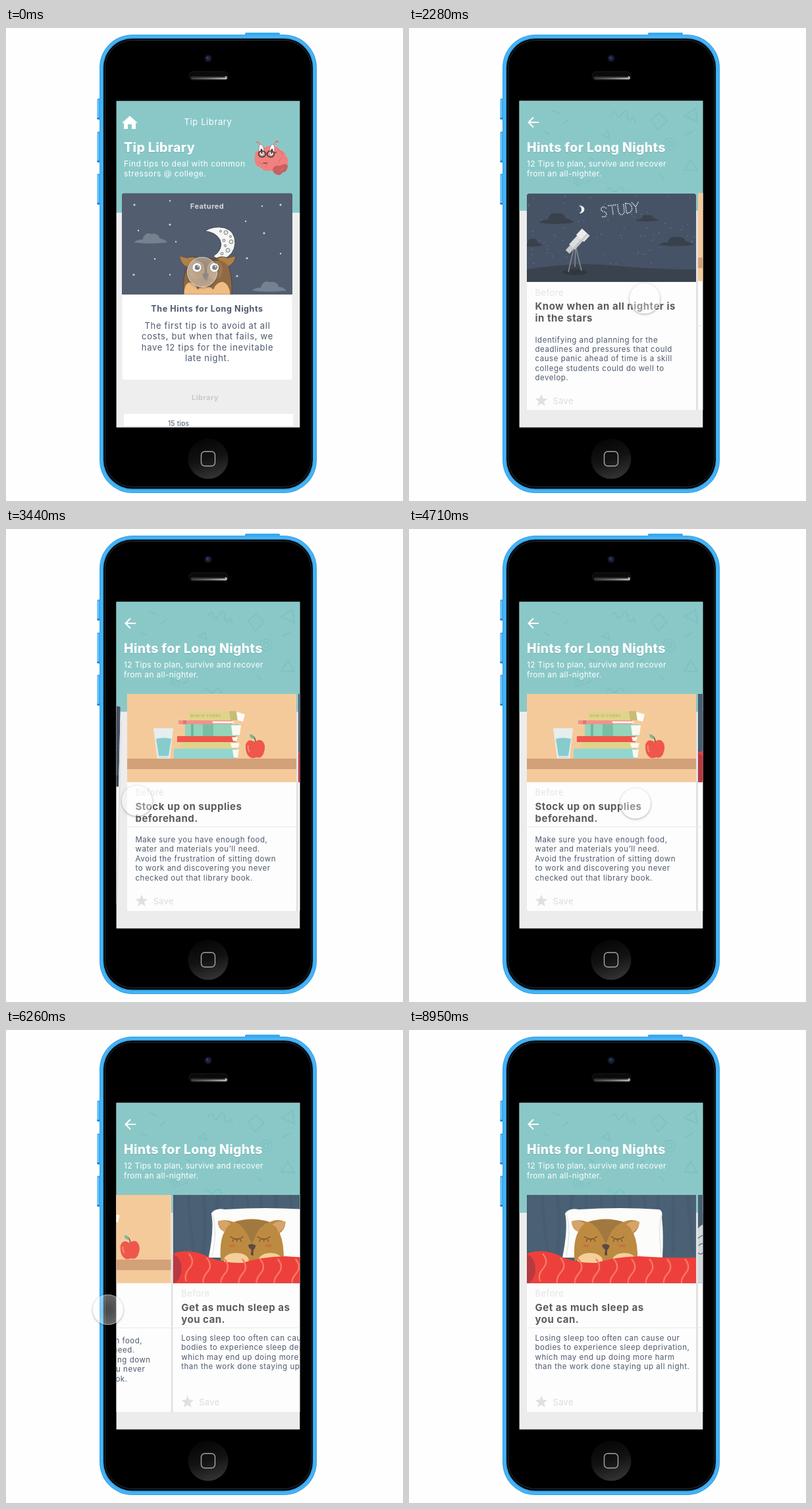
Animation of 603x717 px, one loop 9250 ms. Source, as an HTML page with a canvas:

```html
<!DOCTYPE html>
<html lang="en">
<head>
<meta charset="utf-8">
<title>Tip Library</title>
<style>
html, body { margin: 0; width: 603px; height: 717px; overflow: hidden; background: #fefefe; }
canvas { display: block; }
</style>
</head>
<body>
<canvas id="stage" width="603" height="717"></canvas>
<script>
const LOOP = 9250, PITCH = 260;
const stage = document.getElementById('stage').getContext('2d');
let g = stage;

// ---- drawing helpers ----
function shape(d, fill, stroke, width = 1) {
  const path = new Path2D(d);
  if (fill) { g.fillStyle = fill; g.fill(path); }
  if (stroke) { g.strokeStyle = stroke; g.lineWidth = width; g.stroke(path); }
}
function rect(x, y, w, h, fill) { g.fillStyle = fill; g.fillRect(x, y, w, h); }
function round(x, y, w, h, r, fill, stroke, width = 1) {
  g.beginPath(); g.roundRect(x, y, w, h, r);
  if (fill) { g.fillStyle = fill; g.fill(); }
  if (stroke) { g.strokeStyle = stroke; g.lineWidth = width; g.stroke(); }
}
function oval(x, y, rx, ry, fill, stroke, width = 1) {
  g.beginPath(); g.ellipse(x, y, rx, ry, 0, 0, 7);
  if (fill) { g.fillStyle = fill; g.fill(); }
  if (stroke) { g.strokeStyle = stroke; g.lineWidth = width; g.stroke(); }
}
function text(s, x, y, size, weight, color, gap = 0, align = 'left') {
  g.font = `${weight} ${size}px Inter, "Open Sans", sans-serif`;
  g.letterSpacing = gap + 'px';
  g.textAlign = align;
  g.fillStyle = color;
  g.fillText(s, x, y);
}
function lines(list, x, y, step, ...style) {
  list.forEach((s, i) => text(s, x, y + i * step, ...style));
}
function heading(s) {
  text(s, 179, 188.5, 19.5, 800, 'rgba(60,120,125,.35)', .35);
  text(s, 179, 187.5, 19.5, 800, '#fff', .35);
}
function clipped(x, y, w, h, r, draw) {
  g.save(); g.beginPath(); g.roundRect(x, y, w, h, r); g.clip(); draw(); g.restore();
}
function random(seed) {
  return () => (seed = (seed * 16807) % 2147483647) / 2147483647;
}
function gradient(x0, y0, x1, y1, ...colors) {
  const f = g.createLinearGradient(x0, y0, x1, y1);
  colors.forEach((c, i) => f.addColorStop(i / (colors.length - 1), c));
  return f;
}
function cloud(x, y, w, h, fill) {
  shape(`M${x} ${y}q${w * .12} ${-h * .35} ${w * .26} ${-h * .3}q${w * .08} ${-h * .9} ${w * .26} ${-h * .6}
    q${w * .2} ${-h * .2} ${w * .26} ${h * .5}q${w * .14} 0 ${w * .22} ${h * .4}q${-w * .5} ${h * .25} ${-w} 0z`, fill);
}

// ---- motion: smooth monotone interpolation through keys [time, values...] ----
function track(keys, t, col) {
  const last = keys.length - 1;
  if (t <= keys[0][0]) return keys[0][col];
  if (t >= keys[last][0]) return keys[last][col];
  let i = 0;
  while (t >= keys[i + 1][0]) i++;
  const slope = k => k < 0 || k >= last ? 0 : (keys[k + 1][col] - keys[k][col]) / (keys[k + 1][0] - keys[k][0]);
  const tangent = k => {
    const a = slope(k - 1), b = slope(k);
    return a * b <= 0 ? 0 : 2 * a * b / (a + b);
  };
  const h = keys[i + 1][0] - keys[i][0], u = (t - keys[i][0]) / h, v = 1 - u;
  return keys[i][col] * (1 + 2 * u) * v * v + tangent(i) * h * u * v * v +
    keys[i + 1][col] * u * u * (3 - 2 * u) - tangent(i + 1) * h * u * u * v;
}
const touchKeys = [
  [1200, 298, 370], [1420, 285, 400], [1650, 292, 440], [1850, 325, 454], [2100, 358, 422],
  [2160, 358, 422], [2280, 358, 410], [2570, 358, 410], [2750, 343, 410], [2950, 278, 410],
  [3150, 215, 411], [3300, 201, 412], [3440, 199, 412], [3500, 199, 412], [3800, 235, 420],
  [4150, 325, 450], [4420, 350, 455], [4480, 350, 455], [4710, 344, 416], [5000, 335, 416],
  [5360, 335, 416], [5700, 325, 416], [5920, 290, 416], [6100, 215, 418], [6260, 155, 424],
  [6320, 153, 426], [7080, 149, 434], [8100, 149, 434], [8400, 240, 490], [8650, 430, 610],
  [8950, 632, 745]
];
const scrollKeys = [
  [2570, 0], [2750, 15], [2950, 80], [3150, 185], [3300, 238], [3440, 255], [3620, 260],
  [5360, 260], [5700, 272], [5920, 307], [6100, 382], [6260, 445], [6320, 460], [6600, 500],
  [6850, 516], [7080, 520]
];

// ---- phone ----
function phone() {
  rect(0, 0, 603, 717, '#fefefe');
  for (const [y, h] of [[107, 32], [157, 47], [221, 47]]) {
    round(138.5, y, 7, h, 1.5, '#39a9ef');
    rect(139.5, y + 2, 1.5, h - 4, '#7accfa');
    rect(138.5, y + h - 3, 5, 2, '#1f7fc0');
  }
  round(363, 7, 53, 6, 1.5, '#3aaaf0');
  round(142, 10, 330, 695, 50, '#3aa6ea');
  round(143.5, 11.5, 327, 692, 48.5, '#4ab5f7');
  round(146, 14, 322, 687, 46, '#3caaf0');
  round(148, 16, 318, 682.5, 44, '#04080b');
  round(150.5, 18.5, 313, 677, 42, '#000', '#2c3a43', .8);
  oval(307, 46, 5.5, 5.5, '#13151c');
  oval(307, 46, 3.6, 3.6, '#1a2346');
  oval(306, 45, 1.4, 1.4, '#33457f');
  round(278, 66, 59, 13, 6.5, '#0a0a0a', '#191919');
  round(281, 73, 55, 5, 2.5, gradient(281, 0, 336, 0, '#3a3a3a', '#6a6a6a', '#b0b0b0'));
  round(282, 73, 51, 2, 1, '#262626');
  oval(307, 653, 30.5, 30.5, gradient(296, 622, 314, 684, '#050505', '#121212', '#353535'));
  round(296.5, 642, 21, 22, 5.5, null, '#a7a7a7', 1.4);
}

// ---- library screen ----
function brain() {
  shape('M387 180q-1-7-5-6M407 179q1-8 5-6', null, '#ee7773', 1.2);
  shape('M380 174l3-2M410 171l4 2', null, '#e8615f', 1.5);
  shape('M378 195q-1-8 7-10q2-5 9-4q5-4 11-1q8-1 11 5q8 2 9 9q6 6 2 13q-1 7-8 7q-8 7-17 2q-10 2-14-4q-12-2-10-17z', '#f0817e');
  shape('M405 213q4-6 11-4q7-5 12-1q0 10-8 11q-4 6-9 3q-6-2-6-9z', '#c95f5f');
  shape('M383 203q6 5 10 2M412 184q8 3 8 9M421 196q-6 2-7 8M395 212q-2-4 3-6M416 216q4-1 5-5', null, '#de6f6d', 1.2);
  for (const [x, tilt] of [[388, -.15], [404, .15]]) {
    g.save();
    g.translate(x, 185); g.rotate(tilt);
    oval(0, 0, 3.8, 8.5, '#fff', '#b45c5a', .7);
    oval(0, 2, 1.5, 4, '#3b3637');
    g.restore();
    oval(x + (x < 395 ? 1 : -2), 191, 5.4, 4.6, 'rgba(255,220,215,.2)', '#4e4046', 1.8);
  }
  shape('M394 191h3M407 190l4-2M391 204q3 2 6 0', null, '#4e4046', 1.3);
}
function nightOwl() {
  shape('M264 346L275 349Q285 344 293 350Q305 347 318 350Q327 344 337 349L348 346Q348 355 338 361Q344 377 343 404H270Q268 376 275 362Q266 358 264 346z',
    '#8f6a45', '#4f4034', .9);
  shape('M264 346L275 349Q284 345 290 351Q280 354 275 362Q266 358 264 346zM348 346L337 349Q327 345 322 351Q333 354 338 361Q348 355 348 346z', '#b18048');
  shape('M286 351q19-6 38 0q-12 5-16 17l-4 7l-6-7q-3-12-12-17z', '#695039');
  oval(290, 367, 12, 14, '#9c7850');
  oval(317, 367, 12, 14, '#9c7850');
  for (const x of [290, 316.5]) {
    oval(x, 363, 7.2, 7.2, '#fff', '#6b5846', 1);
    oval(x + .5, 363, 3.8, 3.8, '#30353b');
    oval(x + 2, 361.5, 1.1, 1.1, '#fff');
  }
  shape('M298 373q5-3 10 0q-2 9-4 11q-4-5-6-11z', '#54504e');
  shape('M270 404q0-17 9-19q10 3 12 11q7-6 13-4q6-1 11 4q3-10 14-12q11 4 12 20z', '#efbd84', '#7d5f42', .8);
}
function featured() {
  round(176.5, 251, 258, 282, 3, '#fff');
  clipped(176, 250.5, 259, 153.5, [3, 3, 0, 0], () => {
    rect(176, 250, 259, 154, '#525d70');
    const dots = [249, 262, 195, 268, 201, 307, 249, 298, 364, 293, 417, 268, 389, 270, 392, 311,
      226, 350, 194, 374, 249, 374, 366, 349, 417, 342, 351, 376, 258, 324];
    for (let i = 0; i < dots.length; i += 2) oval(dots[i], dots[i + 1], i % 4 ? 1.6 : 1.2, i % 4 ? 1.6 : 1.2, '#cdd4da');
    cloud(194, 325, 51, 14, '#75818e');
    cloud(373, 398, 53, 14, '#75818e');
    shape('M302 308Q315 299 332 303Q348 308 348 326Q347 344 329 351Q319 350 315 346Q331 335 325 321Q318 309 302 308z', '#f5f5f3', '#3c4552', 1);
    for (const [x, y, r] of [[334, 310, 3], [342, 324, 3], [331, 322, 2], [337, 337, 3], [326, 308, 1.5], [328, 342, 2], [341, 316, 1.5], [333, 330, 1.6]])
      oval(x, y, r, r, '#e2e3e2', '#5f6670', .8);
    nightOwl();
  });
  text('Featured', 305.5, 274, 11, 700, 'rgba(255,255,255,.75)', .45, 'center');
  text('The Hints for Long Nights', 305.5, 430, 12.5, 700, '#4c586d', .6, 'center');
  lines(['The first tip is to avoid at all', 'costs, but when that fails, we', 'have 12 tips for the inevitable', 'late night.'],
    306, 455.5, 16.5, 13, 400, '#4d5a70', .7, 'center');
}
function library() {
  rect(167, 110, 280, 496, '#eee');
  rect(167, 110, 280, 170, '#8ac8c8');
  shape('M176 144L188 133L200 144H197V153H191V146H185V153H179V144z', '#fff');
  text('Tip Library', 307, 147, 13, 400, '#fff', .6, 'center');
  heading('Tip Library');
  lines(['Find tips to deal with common', 'stressors @ college.'], 179, 210, 14.5, 12, 400, '#fff', .5);
  brain();
  featured();
  text('Library', 302.5, 564, 11, 700, '#c9c9c9', .4, 'center');
  rect(179, 585, 257, 18, '#fff');
  clipped(179, 585, 257, 18, 0, () => text('15 tips', 246, 603, 10.5, 400, '#4d5a70', .1));
}

// ---- card pictures, laid out for a card resting at x = 179 ----
function nightSky() {
  rect(179, 250, 257, 135, '#465366');
  const rnd = random(77);
  for (let i = 0; i < 75; i++) oval(181 + rnd() * 253, 254 + rnd() * 104, .6, .6, 'rgba(220,230,240,.45)');
  cloud(197, 295, 53, 15, '#38414c');
  cloud(344, 292, 35, 9, '#38414c');
  cloud(379, 329, 53, 13, '#38414c');
  cloud(172, 330, 30, 11, '#38414c');
  shape('M179 366Q250 354 310 360T436 366V385H179z', '#3a434d');
  shape('M258 269q8 0 8.500 6q-1 6-8 6q4-3 3.500-6q0-4-4-6z', '#f4f4f2');
  g.save();
  g.translate(292, 287); g.rotate(-.13);
  g.lineCap = 'round';
  g.setLineDash([.1, 2.6]);
  shape('M9-13q-4-4-7-1q-2 4 3 6q5 2 3 6q-3 4-8 0M13-16h11M18.500-16v15M27-16v11q1 5 4.500 5t4.500-5v-11M39-16v15q9 0 9-7.500t-9-7.500M49-16l5 7l5-7M54-9v9',
    null, '#e3e7eb', 1.7);
  g.restore();
  oval(252, 370, 19, 4.5, '#2f3740');
  shape('M251 330L242 370M253 330L262 368M253 331L252 362', null, '#85898c', 1.6);
  g.save();
  g.translate(255, 324); g.rotate(-.82);
  rect(-21, -4, 13, 8, '#c6c9c9');
  rect(-11, -6, 21, 12, '#dcdedd');
  rect(7, -8, 13, 16, '#ededeb');
  rect(-11, 2, 31, 4, 'rgba(90,95,100,.2)');
  g.restore();
}
function book(x, y, w, h, color, pages) {
  rect(x, y, w, h, color);
  shape(`M${x + w - pages} ${y + 1.5}H${x + w + 3}L${x + w + 1} ${y + h - 1.5}H${x + w - pages + 2}z`, '#fbf9f2');
}
function desk() {
  rect(179, 250, 257, 135, '#f5ca9b');
  rect(179, 348, 257, 16, '#d3a179');
  shape('M219 302H249L244 348H225z', '#e7eeee');
  shape('M223 318Q234 315 246 318L242 344H227z', '#86cccd');
  rect(227, 345, 15, 2, '#cfdcdc');
  book(250, 333, 96, 15, '#93d5d1', 7);
  book(261, 323, 86, 10, '#e0d38c', 11);
  book(255, 314, 89, 9, '#ef5649', 6);
  book(267, 296, 82, 18, '#94d4ba', 12);
  rect(276, 296, 4, 18, '#6fb59d');
  rect(294, 296, 16, 18, '#78bea5');
  book(257, 290, 82, 6, '#f0938a', 31);
  rect(264, 290, 5, 6, '#d97b73');
  shape('M271 276H344L346 290H273z', '#e0d48d');
  shape('M334 276H345L347 290H336z', '#c9bc74');
  shape('M345 277L358 281L355 292L347 290z', '#fdfbf4');
  text('BOOK OF STUDIES', 275, 285, 4.8, 500, '#b5a860', .2);
  shape('M373 323Q363 316 359 327Q358 342 367 347Q373 348 375 346Q382 349 386 341Q391 329 385 322Q380 317 373 323z', '#ef574b');
  shape('M374 323q0-6-4-9', null, '#7f6247', 1.7);
  shape('M372 318q-7 0-7-7q7 0 7 7z', '#77b99d');
  shape('M363 328q-1 5 2 10', null, '#f58b7f', 2);
}
function sleepyOwl() {
  rect(179, 250, 257, 135, '#4a6074');
  g.save();
  g.globalAlpha = .25;
  for (let i = 0; i < 12; i++) shape(`M${181 + i * 22} 250q${i % 3 * 5 - 4} 45 ${i % 2 * 8} 90`, null, '#3d5164', 3 + i % 4);
  g.restore();
  shape('M233 345Q242 300 237 278Q243 269 258 272Q320 268 380 272Q386 274 384 284Q387 310 385 345z', '#fcfcfb');
  shape('M239 279q8 22 0 63M383 280q-5 20 0 60', null, '#d9dcdf', 1);
  shape('M251 345Q250 318 257 306Q247 301 247 290Q258 286 271 291Q299 282 326 291Q338 285 350 291Q349 303 341 308Q348 324 347 350H252z', '#bd8a42');
  shape('M247 290q13-3 20 4q-8 4-9 12q-10-6-11-16zM350 291q-13-3-20 4q8 4 9 12q10-6 11-16z', '#d6a468');
  shape('M273 291q27-7 52 0q-14 6-20 19l-6 14l-7-14q-7-14-19-19z', '#a1783f');
  for (const x of [276, 317]) {
    shape(`M${x - 10} 313q10 8 20 0M${x - 5} 317l-2 4M${x + 5} 317l2 4M${x} 317v4`, null, '#75502c', 1.3);
    oval(x + (x < 300 ? -7 : 7), 327, 5, 2.2, '#c57340');
  }
  shape('M293 326q6-4 12 1q-2 5-4 7v8l-4-1l1-8q-4-2-5-7z', '#5b4b43');
  oval(275, 349, 19, 11, '#f5cf9a');
  oval(327, 349, 18, 11, '#f5cf9a');
  shape('M179 339Q200 331 224 340Q250 354 285 353Q310 344 350 343Q400 346 436 345V385H179z', '#ee403a');
  shape('M179 340Q193 345 192 366Q190 378 181 385H179z', '#b73a42');
  for (let i = 0; i < 9; i++) {
    const x = 203 + i * 27, y = i < 2 ? 339 + i * 6 : 347;
    shape(`M${x} ${y}q10 12 1 22t-5 20`, null, '#f57a69', 2.3);
  }
}
function nextPicture() {
  rect(179, 250, 257, 135, '#4a6074');
  shape('M179 301Q183 295 190 294H436V385H179z', '#d4d8dc');
  shape('M180 327q4-5 8-2M179 316q5-5 10-5M179 338q5 4 9-2', null, '#56687a', 1.3);
}
const cards = [
  { art: nightSky, top: 251, title: ['Know when an all nighter is', 'in the stars'], bodyY: 476.5,
    body: ['Identifying and planning for the', 'deadlines and pressures that could', 'cause panic ahead of time is a skill', 'college students could do well to', 'develop.'] },
  { art: desk, top: 250, title: ['Stock up on supplies', 'beforehand.'], bodyY: 475, rule: true,
    body: ['Make sure you have enough food,', 'water and materials you’ll need.', 'Avoid the frustration of sitting down', 'to work and discovering you never', 'checked out that library book.'] },
  { art: sleepyOwl, top: 250, title: ['Get as much sleep as', 'you can.'], bodyY: 471, rule: true,
    body: ['Losing sleep too often can cause our', 'bodies to experience sleep deprivation,', 'which may end up doing more harm', 'than the work done staying up all night.'] },
  { art: nextPicture, top: 250, title: [], body: [], bodyY: 471, rule: true }
];
function star(x, y, r) {
  g.beginPath();
  for (let i = 0; i < 10; i++) {
    const a = i * Math.PI / 5 - Math.PI / 2, q = i % 2 ? r * .43 : r;
    g.lineTo(x + q * Math.cos(a), y + q * Math.sin(a));
  }
  g.fillStyle = '#e0e0e0';
  g.fill();
}
function card({ art, top, title, body, bodyY, rule }) {
  const d = top - 250;
  round(179, top, 257, 579 - top, 2, '#fdfdfd');
  clipped(179, top, 257, 133.7, [d * 3, d * 3, 0, 0], art);
  if (rule) rect(179, 451, 257, 1, '#e9e9e9');
  text('Before', 191.5, 404 + d * 1.5, 13, 400, '#e4e4e4', .5);
  lines(title, 191.5, 426 + d, 18, 15, 700, '#5b5b5b', .5);
  lines(body, 191.5, bodyY, 14.4, 11.5, 400, '#4d5a70', .53);
  star(201, 564 + d, 10);
  text('Save', 218.5, 569 + d, 13, 400, '#dcdcdc', .3);
}

// ---- guide screen ----
function pattern() {
  shape('M418 133l17-11l3 20zM293 163l9-7l3 11zM418 215l10-16l10 17zM368 139l12-10l12 12l-14 13zM306 133q7-11 9-2t9-1t8 3t9 2l3 9M218 125l11 5M234 145l9-7M419 163l13-7M268 235l9-5M381 222l8 8M273 196l9 5M300 246q6-7 9-1t9-1t9 5M347 205l9-8M205 157l9 4',
    null, 'rgba(52,135,143,.11)', 2.2);
  for (const r of [9, 4]) oval(395, 176, r, r, null, 'rgba(52,135,143,.1)', 2);
  for (const r of [7, 3]) oval(257, 231, r, r, null, 'rgba(52,135,143,.09)', 2);
}
function guide(scroll) {
  rect(167, 110, 280, 496, '#ececec');
  rect(167, 110, 280, 167, '#8ac8c8');
  pattern();
  shape('M197 143H182M189 135.500L181.500 143L189 150.500', null, '#fff', 2);
  heading('Hints for Long Nights');
  lines(['12 Tips to plan, survive and recover', 'from an all-nighter.'], 179, 210, 14.5, 12, 400, '#fff', .3);
  cards.forEach((c, i) => {
    const dx = i * PITCH - scroll;
    if (dx <= -PITCH + .5 || dx > 270) return;
    g.save();
    if (i) {
      g.translate(dx, 0);
    } else {
      // the first card tilts and shrinks as it leaves
      const p = -dx / PITCH;
      g.translate(436 + dx - 11.5 * p, 451);
      g.rotate(.024 * p);
      g.scale(1 - .09 * p, 1 - .09 * p);
      g.translate(-436, -451);
    }
    rect(436, 277, 3, 302, '#e2e2e2');
    card(c);
    g.restore();
  });
}

function touch(x, y) {
  g.save();
  g.beginPath();
  g.rect(x - 40, y - 40, 80, 80);
  g.arc(x, y, 23, 0, 7);
  g.clip('evenodd');
  g.shadowColor = 'rgba(0,0,0,.36)';
  g.shadowBlur = 3.5;
  g.shadowOffsetY = 1;
  oval(x, y, 23, 23, '#fff');
  g.restore();
  const f = g.createRadialGradient(x, y, 4, x, y, 23);
  f.addColorStop(0, 'rgba(255,255,255,.3)');
  f.addColorStop(1, 'rgba(255,255,255,.4)');
  oval(x, y, 23, 23, f);
  oval(x, y, 22.5, 22.5, null, 'rgba(255,255,255,.35)', 1);
}

// still layers are drawn once
function layer(draw) {
  const c = document.createElement('canvas');
  c.width = 603; c.height = 717;
  g = c.getContext('2d');
  draw();
  g = stage;
  return c;
}
const phoneLayer = layer(phone), libraryLayer = layer(library);

function frame(now) {
  const t = now % LOOP;
  const u = Math.min(1, Math.max(0, (t - 110) / 610));
  const fade = u * u * (3 - 2 * u);
  g.drawImage(phoneLayer, 0, 0);
  clipped(167.6, 110.6, 278.7, 494.8, 0, () => {
    if (fade > 0) guide(track(scrollKeys, t, 1));
    if (fade < 1) {
      g.globalAlpha = 1 - fade;
      g.drawImage(libraryLayer, 0, 0);
    }
  });
  if (t < 8950) touch(track(touchKeys, t, 1), track(touchKeys, t, 2));
}
const start = performance.now();
function tick() {
  frame(performance.now() - start);
  requestAnimationFrame(tick);
}
tick();
</script>
</body>
</html>
```
